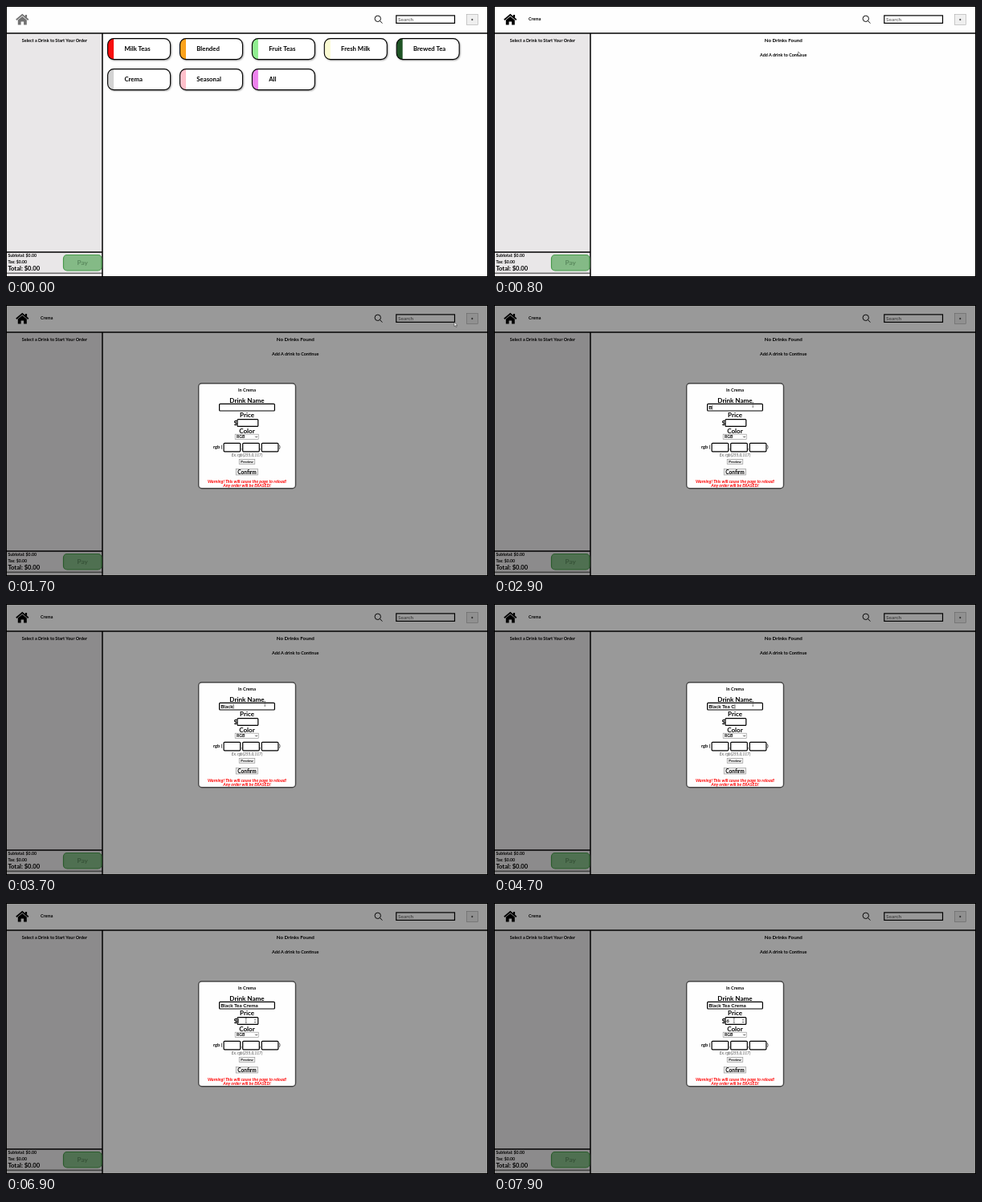
Write an HTML page that moves like this. It is 600x338 px and loops after 8 s.

```html
<!DOCTYPE html>
<html lang="en">
<head>
<meta charset="utf-8">
<title>Drink order screen</title>
<style>
  html, body { margin: 0; width: 100%; height: 100%; overflow: hidden; background: #fff; }
  svg { display: block; width: 100vw; height: 100vh; }
  text { font-family: Lato, "Open Sans", sans-serif; font-weight: 700; white-space: pre; }
  .mid { text-anchor: middle; }
  .box { fill: #fff; stroke: #000; stroke-width: 1.2; }
  .btn { fill: #efefef; stroke: #8a8a8a; stroke-width: .6; }
  .card { filter: drop-shadow(1.5px 1.5px .8px rgba(0, 0, 0, .55)); }
  .warn { fill: #f00; font-style: italic; }
</style>
</head>
<body>
<svg viewBox="0 0 600 338" preserveAspectRatio="none">
  <defs>
    <clipPath id="edge"><rect width="78" height="26" rx="7.5"/></clipPath>
  </defs>

  <rect width="600" height="338" fill="#fefefe"/>

  <!-- order panel -->
  <rect x="0" y="34" width="120" height="304" fill="#e9e7e8"/>
  <path d="M0 34H600" stroke="#000" stroke-width="1.7"/>
  <path d="M120 34V338M0 307H120" stroke="#000" stroke-width="1.5"/>
  <path d="M0 333.2H120" stroke="#000" stroke-width=".8"/>
  <rect x=".5" y=".5" width="599" height="337" fill="none" stroke="#000"/>
  <text class="mid" x="60.4" y="45" font-size="5.47">Select a Drink to Start Your Order</text>
  <text x="2.4" y="313" font-size="5.25">Subtotal: $0.00</text>
  <text x="2.4" y="320.5" font-size="5.2">Tax: $0.00</text>
  <text x="2.4" y="329.8" font-size="7.6">Total: $0.00</text>
  <rect x="71.5" y="310.5" width="47.5" height="19.5" rx="4.5" fill="#84ba86" stroke="#46994a" stroke-width="1.2"/>
  <text class="mid" x="95.2" y="323" font-size="8.3" fill="#5b8a5e">Pay</text>

  <!-- header -->
  <g id="house" stroke="#000" fill="#000">
    <path d="M12.8 17.3L20.3 10.9L27.8 17.3" fill="none" stroke-width="1.8"/>
    <path d="M23.9 11h2.2v3.6h-2.2zM14.8 17.6L20.3 13L25.8 17.6V23.6H22.1V19.4H18.6V23.6H14.8z" stroke="none"/>
  </g>
  <g fill="none" stroke="#111" stroke-width="1">
    <circle cx="462.8" cy="15.8" r="3.7"/>
    <path d="M465.5 18.5L468.4 21.6"/>
  </g>
  <rect class="box" x="485.8" y="11.9" width="72.7" height="9.5"/>
  <text x="488" y="18.5" font-size="6.4" fill="#757575">Search</text>
  <rect class="btn" x="573.3" y="10.5" width="14" height="13" style="stroke:#aaa"/>
  <path d="M579.2 17h2.2M580.3 15.9v2.2" stroke="#222" stroke-width=".8"/>

  <g id="menu"></g>

  <g id="empty">
    <text x="43" y="18.4" font-size="5.3">Crema</text>
    <text class="mid" x="360.3" y="45.2" font-size="6.25">No Drinks Found</text>
    <text class="mid" x="360.2" y="63" font-size="5.45">Add A drink to Continue</text>
  </g>

  <g id="modal">
    <rect width="600" height="338" opacity=".4"/>
    <rect x="239.7" y="97.7" width="120.8" height="131" rx="4" fill="#fefefe" stroke="#444" stroke-width="1.4"/>
    <text class="mid" x="300" y="107.6" font-size="5.5">In Crema</text>
    <text class="mid" x="300" y="121.7" font-size="8.1">Drink Name</text>
    <rect class="box" x="265.6" y="123.4" width="68.8" height="8.6" rx="1"/>
    <text id="name" x="267.2" y="129.9" font-size="6.4"></text>
    <text class="mid" x="300" y="140.4" font-size="8">Price</text>
    <text x="283.4" y="149.8" font-size="8">$</text>
    <rect class="box" x="288" y="142.6" width="25.8" height="8.8" rx="1"/>
    <text id="price" x="289.2" y="149.2" font-size="6"></text>
    <path id="spin" d="M308.8 146.3l1.2-1.5 1.2 1.5zM308.8 147.9l1.2 1.5 1.2-1.5z" fill="#555"/>
    <text class="mid" x="300" y="159.9" font-size="8.1">Color</text>
    <rect class="btn" x="285.2" y="161.2" width="29" height="6.4" style="fill:#fff"/>
    <text x="287" y="166.3" font-size="5.1">RGB</text>
    <path d="M310.3 163.8l1.3 1.3 1.3-1.3" fill="none" stroke="#000" stroke-width=".8"/>
    <text x="258" y="179.2" font-size="5.7">rgb (</text>
    <rect class="box" x="271.1" y="172.4" width="20.6" height="10.4" rx="1"/>
    <text x="292.4" y="180" font-size="5">,</text>
    <rect class="box" x="294.7" y="172.4" width="20.6" height="10.4" rx="1"/>
    <text x="316" y="180" font-size="5">,</text>
    <rect class="box" x="318.3" y="172.4" width="20.6" height="10.4" rx="1"/>
    <text x="340" y="179.2" font-size="5.7">)</text>
    <text class="mid" x="300" y="188.8" font-size="4.85" fill="#777" font-style="italic">Ex. rgb(255,0,117)</text>
    <rect class="btn" x="290.2" y="192.3" width="19.6" height="6"/>
    <text class="mid" x="300" y="196.8" font-size="4.25">Preview</text>
    <rect class="btn" x="286.2" y="204.6" width="27.4" height="7.4"/>
    <text class="mid" x="300" y="210.5" font-size="6.5">Confirm</text>
    <text class="mid warn" x="300" y="222" font-size="5.4">Warning! This will cause the page to reload!</text>
    <text class="mid warn" x="300" y="227.2" font-size="5.4">Any order will be ERASED!</text>
    <rect id="caret" width=".6" height="5.6" fill="#000"/>
  </g>

  <path id="arrow" d="M0 0V5.2L1.3 4.1L2.2 6L3.1 5.6L2.3 3.8H3.9z" fill="#fff" stroke="#222" stroke-width=".5"/>
  <path id="beam" d="M-1-2.8H1M0-2.8V2.8M-1 2.8H1" fill="none" stroke="#444" stroke-width=".6"/>
</svg>

<script>
const LOOP = 8000, STEP = 100;
const OPEN_PAGE = 500, OPEN_MODAL = 1700;
const $ = id => document.getElementById(id);

const cards = [
  ["Milk Teas", "#f80d0d"], ["Blended", "#fca31c"], ["Fruit Teas", "#90ee90"],
  ["Fresh Milk", "#fafad2"], ["Brewed Tea", "#1f5425"],
  ["Crema", "#d3d3d3"], ["Seasonal", "#ffc0cb"], ["All", "#ee82ee"]
];
$("menu").innerHTML = cards.map(([label, color], i) => {
  const x = 126.6 + (i % 5) * 89.9, y = 40.6 + Math.floor(i / 5) * 38;
  return `<g transform="translate(${x} ${y})">
    <rect class="card" width="78" height="26" rx="7.5" fill="#fff"/>
    <rect width="7.5" height="26" fill="${color}" clip-path="url(#edge)"/>
    <rect width="78" height="26" rx="7.5" fill="none" stroke="#000" stroke-width="1.1"/>
    <text x="20.8" y="15.2" font-size="7.8">${label}</text></g>`;
}).join("");

// pointer path: time, x, y
const path = [
  [100, 150, 140], [300, 164, 96], [500, 165, 93], [900, 450, 45],
  [1300, 572, 17], [1600, 574.6, 16.6], [1700, 558, 21.5], [1800, 435, 72.5],
  [1900, 385, 95], [2000, 348, 113], [2100, 325, 126], [2200, 318, 131],
  [2300, 318, 131], [2600, 322.3, 124.4], [5900, 322.3, 124.4],
  [6000, 326, 131], [6200, 330.8, 141], [6300, 337, 147.5], [6400, 342.5, 149],
  [6500, 318, 148], [6600, 298.3, 146.8], [6800, 298.3, 146.8], [6900, 298.8, 146.5], [8000, 298.8, 146.5]
];
const typed = "Black Tea Crema";
const keys = [2900, 3400, 3500, 3600, 3700, 4000, 4200, 4300, 4500, 4700, 4700, 5000, 5100, 5400, 5500];

const show = (id, on) => $(id).style.display = on ? "" : "none";
const between = (t, a, b) => t >= a && t < b;

function pointerAt(t) {
  const i = Math.max(1, path.findIndex(p => p[0] >= t));
  const [t0, x0, y0] = path[i - 1], [t1, x1, y1] = path[i];
  const k = Math.max(0, (t - t0) / (t1 - t0));
  return [x0 + (x1 - x0) * k, y0 + (y1 - y0) * k];
}

function placeCaret(field, y) {
  const x = +field.getAttribute("x") + field.getComputedTextLength();
  $("caret").setAttribute("x", x + .1);
  $("caret").setAttribute("y", y);
}

function draw(t) {
  const home = t < OPEN_PAGE;
  show("menu", home);
  show("empty", !home);
  show("modal", t >= OPEN_MODAL);
  $("house").style.opacity = home ? .55 : 1;

  $("name").textContent = typed.slice(0, keys.filter(k => k <= t).length);
  $("price").textContent = t >= 7400 ? "6" : "";
  show("spin", t >= 6600);

  const inName = between(t, 2800, 6000);
  const inPrice = between(t, 6600, 7100) || between(t, 7400, 7900);
  show("caret", inName || inPrice);
  if (inName) placeCaret($("name"), 124.9);
  if (inPrice) placeCaret($("price"), 144.2);

  const beam = between(t, 2200, 6000) || t >= 6600;
  const [x, y] = pointerAt(t);
  show("arrow", t >= 100 && !beam);
  show("beam", beam);
  $(beam ? "beam" : "arrow").setAttribute("transform", `translate(${x} ${y})`);
}

const start = performance.now();
function tick(now) {
  const t = Math.max(0, now - start) % LOOP;
  draw(Math.floor(t / STEP) * STEP);
  requestAnimationFrame(tick);
}
draw(0);
requestAnimationFrame(tick);
</script>
</body>
</html>
```
